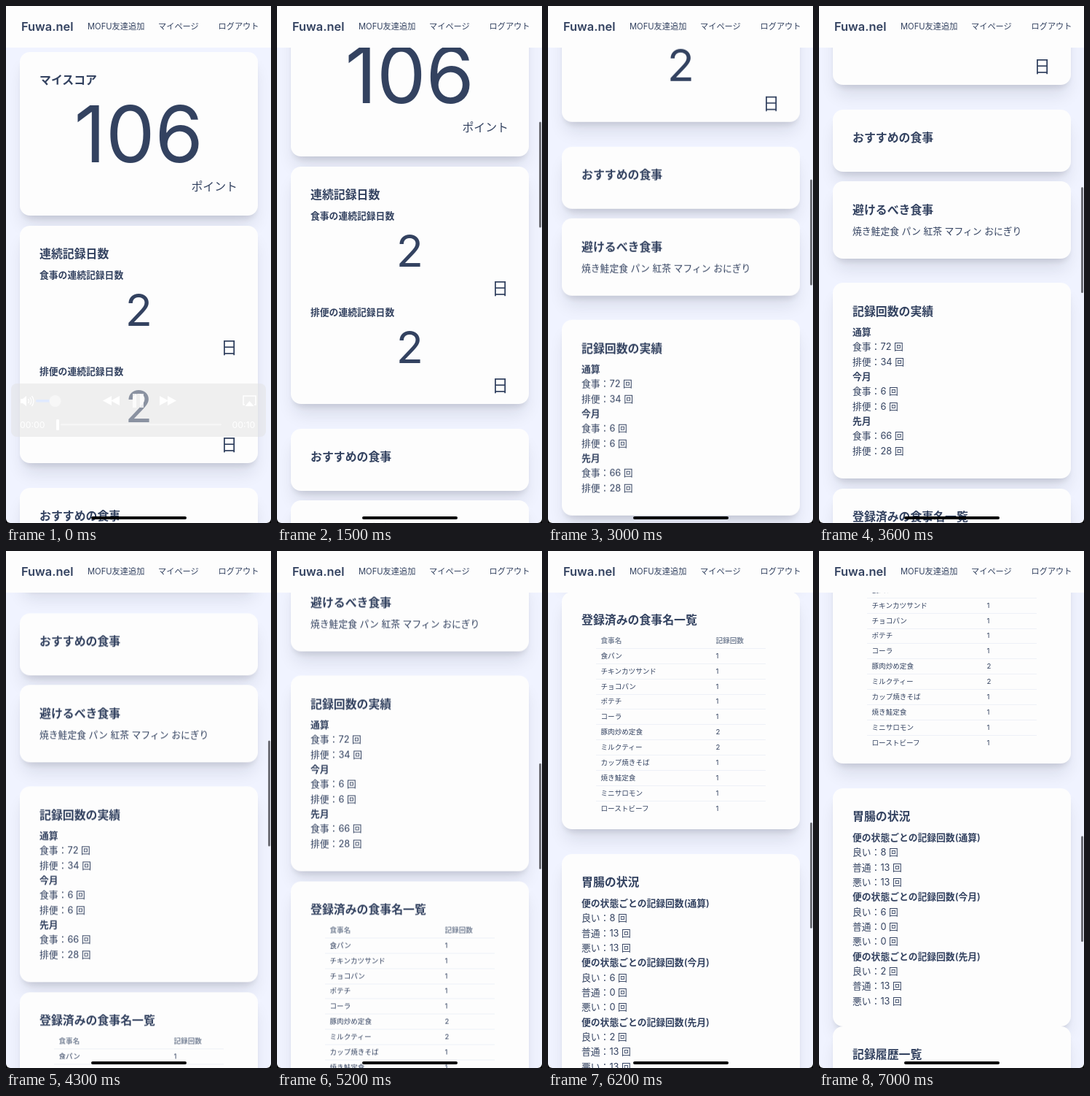
An HTML page for the animation above (7100 ms loop, 364x708 px).

```html
<!DOCTYPE html>
<html lang="ja">
<head>
<meta charset="utf-8">
<title>マイページ</title>
<style>
  :root { --face: Inter, "Noto Sans CJK JP", "Noto Sans CJK", sans-serif; }
  html, body { margin: 0; width: 100%; height: 100%; overflow: hidden; }
  body { position: relative; background: #f0f3ff; color: #334260; font-family: var(--face); }
  #page { position: absolute; left: 0; top: 0; width: 364px; height: 2100px; will-change: transform; }
  .card { position: absolute; left: 19px; width: 326.5px; top: calc(var(--top) * 1px);
    height: calc((var(--end) - var(--top)) * 1px); border-radius: 14px; background: #fdfdfd;
    box-shadow: 0 18px 23px -5px rgba(20, 25, 50, .11), 0 7px 10px -4px rgba(20, 25, 50, .13); }
  /* each text is centred on --y, measured down the page */
  .t { position: absolute; left: 27px; margin: 0; white-space: pre; font: 400 12.8px/20px var(--face);
    top: calc((var(--y) - var(--top) - 10) * 1px); }
  h2.t { font-size: 15.9px; font-weight: 600; }
  h3.t, .list b { font-weight: 600; }
  .big, .num { left: 0; width: 100%; text-align: center; }
  .big { font-size: 107px; }
  .num { font-size: 61px; }
  .unit { left: auto; right: 27.5px; font-size: 23px; }
  .list { font: 400 12.8px/20.35px var(--face); }
  table { position: absolute; left: 47px; top: 57.5px; width: 233px; border-collapse: separate;
    border-spacing: 0; table-layout: fixed; }
  th, td { box-sizing: border-box; height: 20.88px; padding: 0 0 0 6.5px; text-align: left;
    font: 400 9.6px/18px var(--face); white-space: nowrap; border-bottom: 1px solid #eef1f7; }
  th { font-weight: 600; color: #7d889b; }
  th:first-child { width: 158px; }
  tr:last-child td { border: 0; }
  header { position: absolute; left: 0; top: 0; width: 364px; height: 56.5px; background: #fdfdfd; }
  header span { position: absolute; top: 18px; font: 400 11.2px/20px var(--face); white-space: pre; }
  header .brand { left: 21px; font-size: 16.4px; font-weight: 600; }
  #bar { position: absolute; left: 360px; top: 141.5px; width: 2.8px; height: 145.5px;
    border-radius: 2px; background: #6d6e76; visibility: hidden; }
  #player { position: absolute; left: 0; top: 510px; }
  #player text { font-size: 12.3px; }
  .home { position: absolute; left: 117px; top: 699px; width: 130.5px; height: 4.4px;
    border-radius: 3px; background: #000; }
  .screen { position: absolute; inset: -20px 0 0; border-radius: 0 0 6px 6px; box-shadow: 0 0 0 12px #000; }
</style>
</head>
<body>
<div id="page">
  <section class="card" style="--top:63;--end:287">
    <h2 class="t" style="--y:102">マイスコア</h2>
    <div class="t big" style="--y:175">106</div>
    <div class="t unit" style="--y:247.5;font-size:15.9px">ポイント</div>
  </section>
  <section class="card" style="--top:300.5;--end:626">
    <h2 class="t" style="--y:339.5">連続記録日数</h2>
    <h3 class="t" style="--y:368.5">食事の連続記録日数</h3>
    <div class="t num" style="--y:415.5">2</div>
    <div class="t unit" style="--y:468">日</div>
    <h3 class="t" style="--y:501">排便の連続記録日数</h3>
    <div class="t num" style="--y:547.5">2</div>
    <div class="t unit" style="--y:600.5">日</div>
  </section>
  <section class="card" style="--top:660;--end:745">
    <h2 class="t" style="--y:699">おすすめの食事</h2>
  </section>
  <section class="card" style="--top:758;--end:863.5">
    <h2 class="t" style="--y:797.5">避けるべき食事</h2>
    <div class="t" style="--y:826.5">焼き鮭定食 パン 紅茶 マフィン おにぎり</div>
  </section>
  <section class="card" style="--top:897;--end:1165">
    <h2 class="t" style="--y:936.5">記録回数の実績</h2>
    <div class="t list" style="--y:965"><b>通算</b>
食事：72 回
排便：34 回
<b>今月</b>
食事：6 回
排便：6 回
<b>先月</b>
食事：66 回
排便：28 回</div>
  </section>
  <section class="card" style="--top:1178.5;--end:1504">
    <h2 class="t" style="--y:1218">登録済みの食事名一覧</h2>
    <table>
      <tr><th>食事名</th><th>記録回数</th></tr>
      <tr><td>食パン</td><td>1</td></tr>
      <tr><td>チキンカツサンド</td><td>1</td></tr>
      <tr><td>チョコパン</td><td>1</td></tr>
      <tr><td>ポテチ</td><td>1</td></tr>
      <tr><td>コーラ</td><td>1</td></tr>
      <tr><td>豚肉炒め定食</td><td>2</td></tr>
      <tr><td>ミルクティー</td><td>2</td></tr>
      <tr><td>カップ焼きそば</td><td>1</td></tr>
      <tr><td>焼き鮭定食</td><td>1</td></tr>
      <tr><td>ミニサロモン</td><td>1</td></tr>
      <tr><td>ローストビーフ</td><td>1</td></tr>
    </table>
  </section>
  <section class="card" style="--top:1538;--end:1864">
    <h2 class="t" style="--y:1577">胃腸の状況</h2>
    <div class="t list" style="--y:1606"><b>便の状態ごとの記録回数(通算)</b>
良い：8 回
普通：13 回
悪い：13 回
<b>便の状態ごとの記録回数(今月)</b>
良い：6 回
普通：0 回
悪い：0 回
<b>便の状態ごとの記録回数(先月)</b>
良い：2 回
普通：13 回
悪い：13 回</div>
  </section>
  <section class="card" style="--top:1864;--end:2090">
    <h2 class="t" style="--y:1903">記録履歴一覧</h2>
  </section>
</div>

<header>
  <span class="brand">Fuwa.nel</span>
  <span style="left:112px">MOFU友達追加</span>
  <span style="left:209px">マイページ</span>
  <span style="left:291.5px">ログアウト</span>
</header>
<div id="bar"></div>

<svg id="player" width="364" height="90" fill="#fff">
  <rect x="7" y="7" width="350" height="73" rx="8" fill="#e2e2e2" fill-opacity=".5"/>
  <path d="M20 28h3l5-4v14l-5-4h-3z"/>
  <path d="M30.500 28q2 3 0 6M33 26q3.500 5 0 10M35.500 24q5 7 0 14" fill="none" stroke="#fff" stroke-width="1.300"/>
  <rect x="41" y="29" width="22" height="3.500" rx="1.700" fill="#e0eaff"/>
  <circle cx="67.500" cy="31" r="8" fill="#f7f7f7"/>
  <path d="M145 24v13l-12-6.500zM156 24v13l-12-6.500zM211 24v13l12-6.500zM222 24v13l12-6.500z"/>
  <path d="M174 21h5v19h-5zM184 21h5v19h-5z" fill-opacity=".8"/>
  <path d="M328 36h-2v-12h17v12h-2" fill="none" stroke="#fff" stroke-width="1.500"/>
  <path d="M334.500 31l6 7h-12z"/>
  <text x="19" y="67.500">00:00</text>
  <text x="310.500" y="67.500">00:10</text>
  <rect x="75" y="62" width="221" height="2.500" rx="1.200" fill-opacity=".45"/>
  <rect x="69" y="56" width="4" height="15" rx="1.500"/>
</svg>
<div class="home"></div>
<div class="screen"></div>

<script>
  const LOOP = 7100, STEP = 100, FADE = 500;
  // time in ms, scroll offset in px, speed in px per second
  const keys = [
    [900, 0, 0], [1500, 81, 215], [2400, 361, 260], [3600, 518, 75],
    [5200, 726.5, 260], [6200, 1123, 220], [7000, 1213, 50]
  ];
  const [page, bar, player] = ['page', 'bar', 'player'].map(id => document.getElementById(id));

  function scrollAt(t) {
    const i = keys.findIndex(k => k[0] >= t);
    if (i < 1) return 0;
    const [t0, y0, v0] = keys[i - 1], [t1, y1, v1] = keys[i];
    const h = (t1 - t0) / 1000, u = (t - t0) / (t1 - t0), w = 1 - u;
    return w * w * ((1 + 2 * u) * y0 + u * h * v0) + u * u * ((1 + 2 * w) * y1 - w * h * v1);
  }

  function draw(t) {
    const y = scrollAt(t);
    page.style.transform = `translateY(${-y}px)`;
    bar.style.transform = `translateY(${y * 0.2046}px)`;
    bar.style.visibility = y > 0 ? 'visible' : 'hidden';
    player.style.opacity = Math.max(0, 1 - t / FADE);
  }

  const start = performance.now();
  function tick() {
    const t = (performance.now() - start) % LOOP;
    draw(Math.floor(t / STEP) * STEP);
    requestAnimationFrame(tick);
  }
  tick();
</script>
</body>
</html>
```
